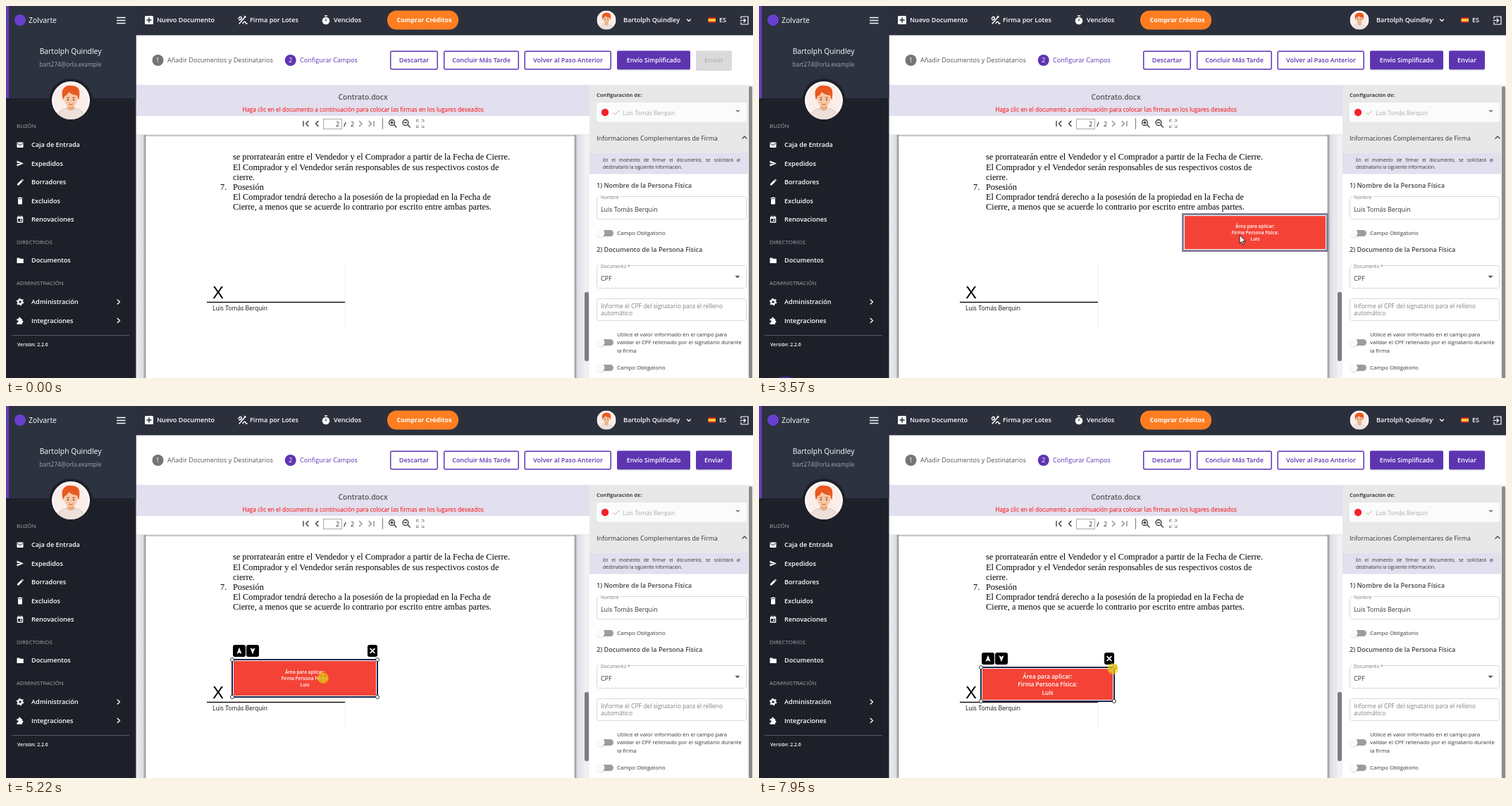
An HTML page for the animation above (8000 ms loop, 1060 by 528 pixels).

```html
<!DOCTYPE html>
<html lang="es">
<head>
<meta charset="utf-8">
<title>Configurar campos</title>
<style>
html, body { margin: 0; width: 100%; height: 100%; overflow: hidden; }
body { font-family: "Open Sans", "Noto Sans", sans-serif; }
#stage { position: relative; width: 1060px; height: 528px; overflow: hidden; background: #fff; }
#stage > svg { position: absolute; left: 0; top: 0; }
svg { display: block; overflow: visible; }
.mid { text-anchor: middle; }
.b { font-weight: 700; }
.m { font-weight: 500; }
.s { font-weight: 600; }
.nav { font-size: 9.1px; font-weight: 600; fill: #fff; }
.head { font-size: 8px; fill: #a3a6ae; }
.btn { font-size: 9px; font-weight: 600; text-anchor: middle; fill: #5e35b1; }
.doc { font: 12.34px "Liberation Serif", serif; fill: #000; }
.tag { font-size: 6.6px; fill: #777; }
.val { font-size: 8.85px; fill: #333; }
.opt { font-size: 7.8px; fill: #333; }
.line { fill: none; stroke-linecap: round; stroke-linejoin: round; }
.field { fill: #fff; stroke: #d9d9d9; }

#note { position: absolute; left: 847px; top: 214px; width: 195px; font-size: 6.5px; line-height: 10px; color: #333; text-align: justify; }

/* one 8 s timeline shared by every part */
#on, #arc, #popup, #area, #area div, #cursor, #cursor g { animation: 8s linear infinite; }
.step { animation-timing-function: step-end !important; }

#on { animation-name: on !important; }
@keyframes on { 0% { opacity: 0 } 33.75%, 100% { opacity: 1 } }
#arc { animation-name: arc !important; }
@keyframes arc { 0% { opacity: 0 } 33.75% { opacity: 1 } 53.1%, 100% { opacity: 0 } }

#popup { position: absolute; left: 496px; top: 249px; width: 201px; height: 98px; background: #fff;
  box-shadow: 0 1px 3px rgba(0,0,0,.35); transform-origin: 100% 100%; animation-name: popup !important; }
@keyframes popup {
  0%, 15.25% { opacity: 0; transform: scale(.8) }
  16.75%, 31.875% { opacity: 1; transform: none }
  33.125%, 100% { opacity: 0; transform: none }
}

#area { position: absolute; display: flex; align-items: center; justify-content: center; text-align: center;
  background: #f44336; color: #fff; font-weight: 600; line-height: 1.38; white-space: nowrap; animation-name: area, placed !important;
  animation-timing-function: linear, step-end !important; }
@keyframes placed { 0% { opacity: 0 } 33%, 100% { opacity: 1 } }
@keyframes area {
  0%, 52.5% { left: 601px; top: 295px; width: 206px; height: 53px; font-size: 6.6px }
  58.25% { left: 417px; top: 328px }
  62.5% { left: 333px; top: 352px }
  65.25% { left: 321px; top: 360px }
  70.25%, 96.375% { left: 315px; top: 366px; width: 206px; height: 53px; font-size: 6.6px }
  99.375%, 100% { left: 315px; top: 371px; width: 189px; height: 48px; font-size: 8.3px }
}
.idle, .sel { position: absolute; inset: -1px; box-shadow: inset 0 0 0 1px #fff; }
.idle { border: 3px solid #85809a; animation-name: idle !important; }
.sel { border: 2px solid #1c2350; animation-name: sel !important; }
@keyframes idle { 0% { opacity: 1 } 52.5%, 100% { opacity: 0 } }
@keyframes sel { 0% { opacity: 0 } 52.5%, 100% { opacity: 1 } }
.sel i { position: absolute; width: 4px; height: 4px; margin: -4px; border: 1px solid #333; border-radius: 50%; background: #fff; }
.sel svg { position: absolute; top: -22px; }
.tl { left: 0; top: 0; } .tr { right: 0; top: 0; } .bl { left: 0; bottom: 0; } .br { right: 0; bottom: 0; }

#cursor { position: absolute; left: 0; top: 0; width: 1px; height: 1px; animation-name: path !important; }
@keyframes path {
  0% { transform: translate(862px, 504px); visibility: hidden }
  3.37% { transform: translate(862px, 504px); visibility: hidden }
  3.38% { transform: translate(862px, 504px); visibility: visible; animation-timing-function: ease-in-out }
  11.75%, 15.25% { transform: translate(694px, 347px) }
  18% { transform: translate(688px, 362px) }
  25%, 25.7% { transform: translate(603px, 320px) }
  27.75%, 31.875% { transform: translate(594px, 323px) }
  41.125% { transform: translate(668px, 329px) }
  44.625% { transform: translate(682px, 325px) }
  51.875%, 52.5% { transform: translate(706px, 326px) }
  58.25% { transform: translate(522px, 360px) }
  62.5% { transform: translate(456px, 380px) }
  65.25% { transform: translate(450px, 386px) }
  70.25%, 78.625% { transform: translate(444px, 391px) }
  88.625%, 96.375% { transform: translate(521.5px, 370px); visibility: visible }
  99.375%, 100% { transform: translate(502px, 373px); visibility: visible }
}
#arrow { animation-name: arrow !important; }
#hand { animation-name: hand !important; }
#move { animation-name: move !important; }
#size { animation-name: size !important; }
#press { animation-name: press !important; }
@keyframes arrow { 0% { opacity: 1 } 23.2% { opacity: 0 } 33% { opacity: 1 } 52.5%, 100% { opacity: 0 } }
@keyframes hand { 0% { opacity: 0 } 23.2% { opacity: 1 } 33%, 100% { opacity: 0 } }
@keyframes move { 0% { opacity: 0 } 52.5% { opacity: 1 } 90.6%, 100% { opacity: 0 } }
@keyframes size { 0% { opacity: 0 } 90.6%, 100% { opacity: 1 } }
@keyframes press { 0% { opacity: 0 } 52.5% { opacity: 1 } 72.375% { opacity: 0 } 90.6%, 100% { opacity: 1 } }
</style>
</head>
<body>
<div id="stage">
<svg width="1060" height="528" viewBox="0 0 1060 528">
  <defs>
    <clipPath id="round"><circle r="27"/></clipPath>
    <symbol id="face" viewBox="-27 -27 54 54">
      <circle r="27" fill="#fff"/>
      <circle r="24.5" fill="#fbeee8"/>
      <g clip-path="url(#round)">
        <path d="M-20 27q0-13 14-16h12q14 3 14 16z" fill="#eee0da" stroke="#c8c2c8" stroke-width=".8"/>
        <path d="M-5 4h10v8q-5 5-10 0z" fill="#eeaa84"/>
        <ellipse cy="-3" rx="9.5" ry="12" fill="#f8c6a4"/>
        <path d="M-11 0q-3-12 0-16 4-6 12-5 9 0 11 7 1 6-1 14l-2-7q-8-1-12-5-2 5-6 6z" fill="#e8591f"/>
        <path d="M-6-4h4M2-4h4" stroke="#a34a20" stroke-width="1.2"/>
        <circle cx="-4" cy="-1" r="1" fill="#333"/><circle cx="4" cy="-1" r="1" fill="#333"/>
        <path d="M-3 5q3 2.5 6 0" fill="none" stroke="#b4573a"/>
      </g>
    </symbol>
    <g id="toggle">
      <rect x="-1" y="-4.5" width="19" height="9" rx="4.5" fill="#9c9c9c"/>
      <circle cy=".8" r="6.2" fill="#000" opacity=".13"/>
      <circle cx="-.5" r="6" fill="#fafafa"/>
    </g>
    <path id="chev" class="line" d="M-1.8-3L1.5 0-1.8 3" stroke-width="1.4"/>
    <path id="caret" d="M-3.5-1.7h7L0 1.8z"/>
    <linearGradient id="shade"><stop offset="0" stop-color="#ececf1"/><stop offset=".7" stop-color="#dedee4"/><stop offset="1" stop-color="#85858a"/></linearGradient>
  </defs>

  <!-- viewer -->
  <rect x="184" y="112" width="644" height="44" fill="#e2dfee"/>
  <text class="mid s" x="506.5" y="133" font-size="10.3" fill="#555">Contrato.docx</text>
  <text class="mid" x="506.5" y="149.5" font-size="8.25" fill="#f00">Haga clic en el documento a continuación para colocar las firmas en los lugares deseados</text>
  <g class="line" stroke="#333" stroke-width="1.3">
    <path d="M422 163.5v7M429 163.5l-3.5 3.5 3.5 3.5M443 163.5l-3.5 3.5 3.5 3.5"/>
    <path d="M501.5 163.5l3.5 3.5-3.5 3.5M515 163.5l3.5 3.5-3.5 3.5M522 163.5v7" stroke="#888"/>
    <path d="M534.5 159.5v15" stroke="#777" stroke-width="1"/>
    <circle cx="547.5" cy="165.5" r="4"/><path d="M550.5 168.5l3.5 3.5M545.7 165.5h3.6M547.5 163.7v3.6"/>
    <circle cx="567" cy="165.5" r="4"/><path d="M570 168.5l3.5 3.5M565.2 165.5h3.6"/>
    <path d="M582.5 164.5v-3h3M590 161.5h3v3M593 169.5v3h-3M585.5 172.5h-3v-3M583 162l3 3M592.5 162l-3 3M592.5 172l-3-3M583 172l3-3" stroke="#999" stroke-width="1"/>
  </g>
  <rect x="450.5" y="160.5" width="26" height="14" fill="#fff" stroke="#aaa"/>
  <g font-size="9" fill="#333"><text x="468" y="170.7">2</text><text x="479" y="170.7" class="b">/</text><text x="489" y="170.7">2</text></g>
  <rect x="184" y="182" width="644" height="346" fill="#e6e6eb"/>
  <rect x="184" y="183" width="14.5" height="345" fill="url(#shade)"/>
  <rect x="806.5" y="183" width="14.5" height="345" fill="url(#shade)" transform="rotate(180 813.75 355.5)"/>
  <rect x="198.5" y="184.5" width="608" height="344" fill="#fff"/>
  <path d="M198 184h609" stroke="#a0a0a5"/>
  <rect x="821" y="183" width="7" height="345" fill="#f1f1f3"/>
  <rect x="821" y="406" width="6" height="98" rx="2.5" fill="#7d7d80"/>
  <g class="doc">
    <text x="322" y="218">se prorratearán entre el Vendedor y el Comprador a partir de la Fecha de Cierre.</text>
    <text x="322" y="232.500">El Comprador y el Vendedor serán responsables de sus respectivos costos de</text>
    <text x="322" y="246.500">cierre.</text>
    <text x="304" y="260.700">7.</text><text x="322" y="260.700">Posesión</text>
    <text x="322" y="275">El Comprador tendrá derecho a la posesión de la propiedad en la Fecha de</text>
    <text x="322" y="289">Cierre, a menos que se acuerde lo contrario por escrito entre ambas partes.</text>
  </g>
  <path d="M481.5 363v97" stroke="#f0f0f0"/>
  <text x="293" y="414.500" style="font:24px 'Liberation Sans',sans-serif">X</text>
  <path d="M285 420.500h196" stroke="#111" stroke-width="1.5"/>
  <text x="293" y="431.800" font-size="8.55" fill="#111">Luis Tomás Berquin</text>

  <!-- sidebar -->
  <rect width="184.5" height="528" fill="#1e2029"/>
  <rect width="184.5" height="131" fill="#2c323f"/>
  <rect width="4" height="131" fill="#673ab7"/>
  <circle cx="20" cy="20" r="8" fill="#6a3fd0"/>
  <text x="32" y="24" font-size="10.5" fill="#fff">Zolvarte</text>
  <path d="M157 16.5h12.5M157 20.5h12.5M157 24.5h12.5" stroke="#fff" stroke-width="1.3"/>
  <text class="mid m" x="91.5" y="68" font-size="10.35" fill="#fff">Bartolph Quindley</text>
  <text class="mid" x="91.5" y="86" font-size="8.3" fill="#a3a6ae">bart274@orla.example</text>
  <circle cx="92" cy="134" r="31" fill="#1e2029"/>
  <use href="#face" x="65" y="107" width="54" height="54"/>
  <text class="head" x="15" y="173">BUZÓN</text>
  <text class="head" x="15" y="338">DIRECTORIOS</text>
  <text class="head" x="15" y="396">ADMINISTRACIÓN</text>
  <g class="nav">
    <text x="36" y="200.3">Caja de Entrada</text>
    <text x="36" y="226.8">Expedidos</text>
    <text x="36" y="253.3">Borradores</text>
    <text x="36" y="279.8">Excluidos</text>
    <text x="36" y="306.3">Renovaciones</text>
    <text x="36" y="364.3">Documentos</text>
    <text x="36" y="423">Administración</text>
    <text x="36" y="449.5">Integraciones</text>
  </g>
  <g fill="#fff">
    <rect x="15.5" y="193.5" width="9" height="7.5" rx="1"/>
    <path d="M16 195l4 2.7 4-2.7" fill="none" stroke="#1e2029"/>
    <path d="M15.5 219.5l9.5 4-9.5 4v-3l6-1-6-1z"/>
    <path d="M16 254.5v-2l5.5-5.5 2 2-5.5 5.5zM22 246.5l1-1 2 2-1 1z"/>
    <path d="M17 274h6v6.5q0 1-1 1h-4q-1 0-1-1zM16.5 272h2l.5-.7h2l.5.7h2v1.2h-7z"/>
    <path d="M15.8 299h8.4v8.5h-8.4zM17.5 297.5h1.2v2h-1.2zM21.3 297.5h1.2v2h-1.2z"/>
    <path d="M17 302h6v4h-6z" fill="#1e2029"/><path d="M20 303h2v2h-2z"/>
    <path d="M15.5 357.5h3.5l1 1.2h4.8v6.3h-9.3z"/>
    <circle cx="20" cy="420" r="2.8" fill="none" stroke="#fff" stroke-width="2.2"/>
    <circle cx="20" cy="420" r="4.5" fill="none" stroke="#fff" stroke-width="1.5" stroke-dasharray="2.2 2.51"/>
    <path d="M15.5 444h2.5a1.6 1.6 0 1 1 3 0h2v2.5a1.5 1.5 0 1 1 0 3v2.3h-7.5v-2.6a1.5 1.5 0 1 0 0-2.7z"/>
  </g>
  <use href="#chev" x="160" y="420" stroke="#fff"/>
  <use href="#chev" x="160" y="446.5" stroke="#fff"/>
  <path d="M8 467.5h167" stroke="#555862"/>
  <text class="s" x="16" y="482.7" font-size="6.8" fill="#fff">Versión: 2.2.6</text>
  <circle id="arc" class="step" cx="37" cy="555" r="29" fill="#4f2da8"/>

  <!-- header -->
  <rect x="184" width="876" height="41.5" fill="#2c303c"/>
  <rect x="197" y="14" width="12" height="12" rx="1.5" fill="#fff"/>
  <path d="M203 16.5v7M199.5 20h7" stroke="#2c303c" stroke-width="1.5"/>
  <path class="line" d="M331 25l7.5-8.5M330 18q2-4 4-2t-3 4M336 24.5q3-4 4-1t2 1" stroke="#fff" stroke-width="1.5"/>
  <path d="M337.5 15l1.5-1.5 2 2-1.5 1.5z" fill="#fff"/>
  <circle cx="454" cy="21" r="5.3" fill="#fff"/>
  <path d="M452 14h4" stroke="#fff" stroke-width="1.5"/><path d="M454 18v3.5" stroke="#2c303c" stroke-width="1.2"/>
  <g class="nav">
    <text x="214" y="23.3">Nuevo Documento</text>
    <text x="346" y="23.3">Firma por Lotes</text>
    <text x="465" y="23.3">Vencidos</text>
    <text x="876" y="23.3">Bartolph Quindley</text>
    <text x="1012" y="23.3">ES</text>
  </g>
  <rect x="541" y="6.5" width="101" height="27" rx="13" fill="#fd7e22"/>
  <text class="mid b" x="593.5" y="23.3" font-size="8.9" fill="#fff">Comprar Créditos</text>
  <use href="#face" x="838.5" y="6.5" width="27" height="27"/>
  <path class="line" d="M966.5 19l2.5 2.5 2.5-2.5" stroke="#fff" stroke-width="1.3"/>
  <path d="M996.5 16h10.5v8h-10.5z" fill="#d0202a"/><path d="M996.5 18h10.5v4h-10.5z" fill="#fbc531"/>
  <path class="line" d="M1043 18v-3h10v11h-10v-3M1042 20.5h7M1047 18l2.5 2.5-2.5 2.5" stroke="#fff" stroke-width="1.2"/>

  <!-- steps and buttons -->
  <circle cx="215.5" cy="77" r="8" fill="#757575"/>
  <circle cx="403.7" cy="77" r="8" fill="#5e35b1"/>
  <g class="mid" font-size="8.5" fill="#fff"><text x="215.5" y="80">1</text><text x="403.7" y="80">2</text></g>
  <text x="229" y="80.3" font-size="9.08" fill="#555">Añadir Documentos y Destinatarios</text>
  <text x="417" y="80.3" font-size="9.08" fill="#5e35b1">Configurar Campos</text>
  <g fill="#fff" stroke="#5e35b1" stroke-width="1.5">
    <rect x="545.7" y="64.2" width="66.5" height="25.5" rx="2"/>
    <rect x="621.7" y="64.2" width="105.5" height="25.5" rx="2"/>
    <rect x="736.2" y="64.2" width="122" height="25.5" rx="2"/>
  </g>
  <rect x="867" y="64.5" width="104" height="27" rx="2" fill="#000" opacity=".2"/>
  <rect x="867" y="63.5" width="104" height="26.5" rx="2" fill="#5e35b1"/>
  <rect x="979" y="64.5" width="51" height="27" rx="2" fill="#000" opacity=".2"/>
  <rect x="979" y="63.5" width="51" height="26.5" rx="2" fill="#dadada"/>
  <text class="btn" x="579" y="80.3">Descartar</text>
  <text class="btn" x="674.5" y="80.3">Concluir Más Tarde</text>
  <text class="btn" x="797.5" y="80.3">Volver al Paso Anterior</text>
  <text class="btn b" x="919" y="80.3" style="fill:#fff;font-size:8.7px">Envío Simplificado</text>
  <text class="btn" x="1004.5" y="80.3" style="fill:#b3b3b3">Enviar</text>
  <g id="on" class="step">
    <rect x="979" y="63.5" width="51" height="26.5" rx="2" fill="#5e35b1"/>
    <text class="btn b" x="1004.5" y="80.3" style="fill:#fff">Enviar</text>
  </g>

  <!-- settings panel -->
  <rect x="828" y="182" width="232" height="346" fill="#fff"/>
  <rect x="828" y="112" width="225" height="97" fill="#e8e8e8"/>
  <rect x="828" y="209" width="225" height="29.5" fill="#e2dfee"/>
  <text class="b" x="838" y="129" font-size="7.4" fill="#444">Configuración de:</text>
  <rect x="838" y="137" width="213" height="27.5" rx="3" fill="#fbfbfb"/>
  <circle cx="850" cy="151" r="5.2" fill="#f5222d"/>
  <path class="line" d="M862 151.5l2.5 2.5 5.5-5.5" stroke="#aaa"/>
  <text x="875" y="154.7" font-size="8.1" fill="#a8a8a8">Luis Tomás Berquin</text>
  <use href="#caret" x="1038.5" y="149.5" fill="#8a8a8a"/>
  <text class="m" x="838" y="190.7" font-size="8.9" fill="#333">Informaciones Complementares de Firma</text>
  <path class="line" d="M1045 188l3-3 3 3" stroke="#444" stroke-width="1.3"/>
  <g class="s" font-size="9.15" fill="#444">
    <text x="838" y="257.5">1) Nombre de la Persona Física</text>
    <text x="838" y="349.2">2) Documento de la Persona Física</text>
  </g>
  <rect class="field" x="838.5" y="270.5" width="212" height="32" rx="3"/>
  <rect class="field" x="838.5" y="368.5" width="212" height="32" rx="3"/>
  <rect class="field" x="838.5" y="415.5" width="212" height="31" rx="3"/>
  <path d="M842 270.5h29M842 368.5h44" stroke="#fff" stroke-width="2"/>
  <text class="tag" x="844" y="273.7">Nombre</text>
  <text class="tag" x="844" y="371.7">Documento *</text>
  <text class="val" x="844" y="291.5">Luis Tomás Berquin</text>
  <text class="val" x="844" y="389.5">CPF</text>
  <use href="#caret" x="1038" y="384.5" fill="#555"/>
  <g font-size="8.5" fill="#808080">
    <text x="844" y="429">Informe el CPF del signatario para el relleno</text>
    <text x="844" y="439.3">automático</text>
  </g>
  <use href="#toggle" x="844" y="322.5"/>
  <use href="#toggle" x="844" y="477.5"/>
  <use href="#toggle" x="844" y="513.5"/>
  <g class="opt">
    <text x="867" y="325.3">Campo Obligatorio</text>
    <text x="867" y="469">Utilice el valor informado en el campo para</text>
    <text x="867" y="480.3">validar el CPF rellenado por el signatario durante</text>
    <text x="867" y="491.6">la firma</text>
    <text x="867" y="516.3">Campo Obligatorio</text>
  </g>
  <rect x="1053" y="112" width="7" height="416" fill="#f1f1f1"/>
  <rect x="1054" y="114" width="5" height="420" rx="2" fill="#8b8b8b"/>
</svg>
<div id="note">En el momento de firmar el documento, se solicitará al destinatario la siguiente información.</div>

<div id="popup">
  <svg width="201" height="98" viewBox="496 249 201 98">
    <path d="M678.5 259l7 7M685.5 259l-7 7" stroke="#666"/>
    <g font-size="7.7" fill="#555">
      <text x="508" y="276">Haz clic en las firmas a continuación para</text>
      <text x="508" y="287.5">posicionarlas en cada uno de los documentos</text>
    </g>
    <rect x="508" y="299" width="175" height="31" rx="2.5" fill="#f44336"/>
    <g class="line" stroke="#fff"><path d="M516 317l7-8 2 1.5-6 6zM515 311q3-4 3-1M516 320h5"/><circle cx="528" cy="314" r="2"/><path d="M524 321v-1q4-3.5 8 0v1z"/></g>
    <g font-size="6.25" fill="#fff">
      <text class="b" x="539" y="311.5">Luis Tomás Berquin</text>
      <text x="539" y="322">Firmar como <tspan class="b">Persona Física</tspan></text>
    </g>
  </svg>
</div>

<div id="area">
  <span>Área para aplicar:<br>Firma Persona Física:<br>Luis</span>
  <div class="idle step"></div>
  <div class="sel step">
    <svg width="37" height="17" style="left:0">
      <rect width="18" height="17" rx="3"/><rect x="19" width="18" height="17" rx="3"/>
      <path d="M9 3.500l3.500 9.500-3.500-2-3.500 2zM28 13.500L31.500 4l-3.500 2L24.500 4z" fill="#fff"/>
    </svg>
    <svg width="14" height="17" style="right:-1px">
      <rect width="14" height="17" rx="3"/><path d="M3.700 5.200l6.600 6.600M10.300 5.200l-6.600 6.600" stroke="#fff" stroke-width="1.7"/>
    </svg>
    <i class="tl"></i><i class="tr"></i><i class="bl"></i><i class="br"></i>
  </div>
</div>

<div id="cursor">
  <svg width="1" height="1">
    <g id="arrow" class="step"><path d="M0 0v12l2.8-2.6 2 4.6 1.8-.8-2-4.5h3.8z" fill="#fff" stroke="#111" stroke-width=".9"/></g>
    <g id="hand" class="step"><path d="M-1.3 1.3a1.3 1.3 0 0 1 2.6 0v4.7l5 1.2q1.4.5 1.2 2l-.8 4v2.5H0v-1.5l-4-5q-.5-1.8 1.5-1.2l1.2 1.2z" fill="#fff" stroke="#111" stroke-width=".9"/></g>
    <g id="move" class="step">
      <path d="M0-6.5L2.4-3.8H.8V-.8H3.8V-2.4L6.5 0 3.8 2.4V.8H.8V3.8H2.4L0 6.5-2.4 3.8H-.8V.8H-3.8V2.4L-6.5 0-3.8-2.4V-.8H-.8V-3.8H-2.4z" fill="#fff" stroke="#333" stroke-width=".8"/>
    </g>
    <g id="size" class="step"><path d="M5-5v4.5L3.4-2.1-2.1 3.4-.5 5H-5V.5L-3.4 2.1 2.1-3.4.5-5z" fill="#fff" stroke="#333" stroke-width=".8"/></g>
    <g id="press" class="step"><circle r="7.7" fill="#f5c800" opacity=".68"/></g>
  </svg>
</div>
</div>
</body>
</html>
```
